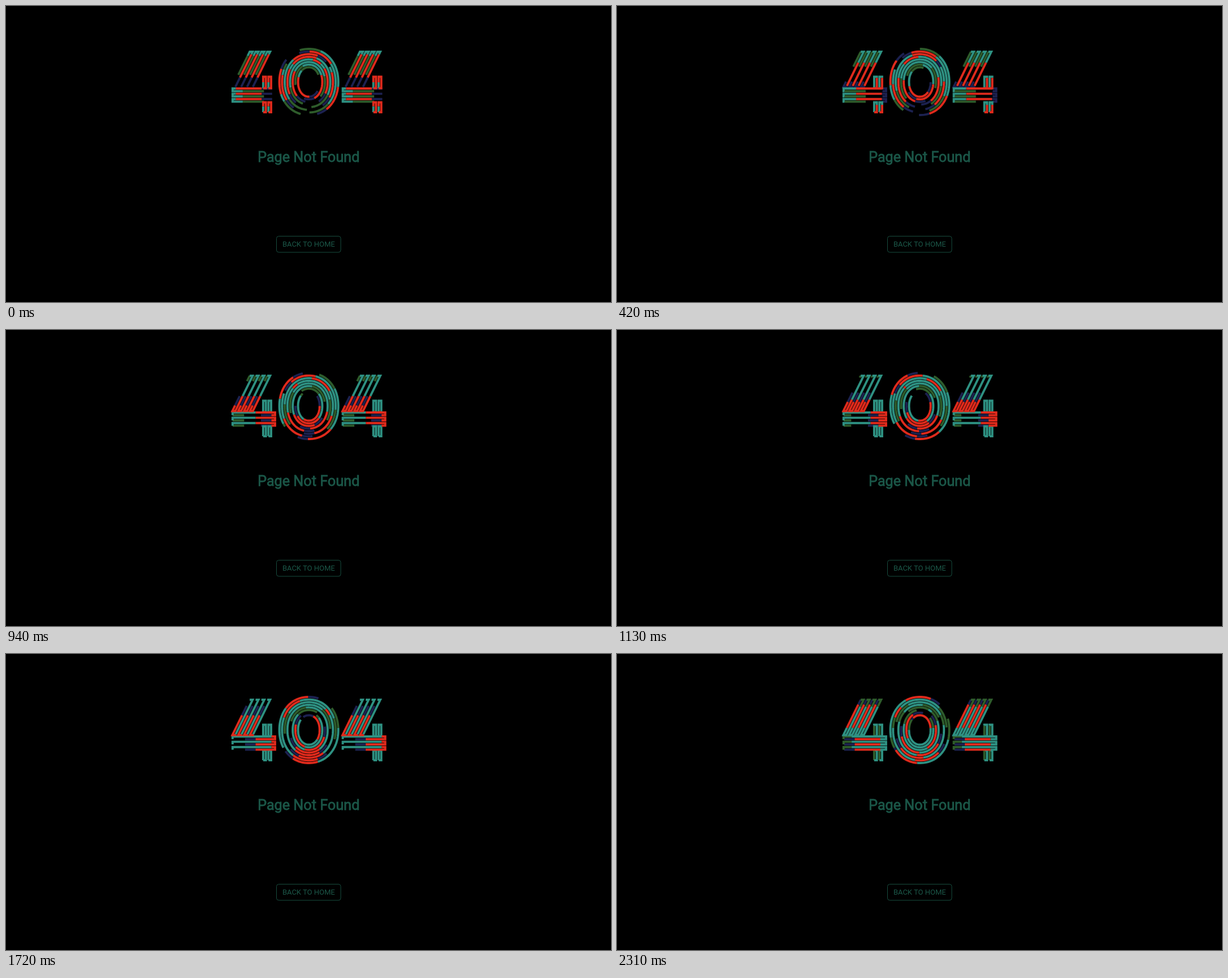
An HTML page that plays this animation: 1068 px wide and 524 px high, repeating every 2.36 s.

```html
<!DOCTYPE html>
<html lang="en">
<head>
<meta charset="utf-8">
<title>404</title>
<style>
  html, body { margin: 0; height: 100%; overflow: hidden; background: #000; }
  svg { display: block; width: 1068px; height: 524px; }
  text { font-family: Roboto, sans-serif; fill: #1b5748; text-anchor: middle; }
  .title { font-size: 25.2px; stroke: #1b5748; stroke-width: .8px; }
  .label { font-size: 13px; }
  .button { fill: none; stroke: #174c3e; }
  #digits { fill: none; stroke-width: 3.9px; }
</style>
</head>
<body>
<svg viewBox="0 0 1068 524">
  <g id="digits"></g>
  <text class="title" x="534.2" y="276">Page Not Found</text>
  <rect class="button" x="477.5" y="407.5" width="113.5" height="28.5" rx="4"/>
  <text class="label" x="534.3" y="426">BACK TO HOME</text>
</svg>
<script>
const LOOP = 2360;        // ms
const STEP = 65.3;        // ms each pose is held
const TRAVEL = 2.33;      // px the dashes advance per pose
const PERIOD = 206.5;     // px until the colours repeat

// Each colour is one dash per period: where it starts and how long it is.
const strands = [
  { color: '#1c2150', start: 56, length: 18.5 },
  { color: '#2e5c2b', start: 104, length: 37.5 },
  { color: '#2e9182', start: 141.5, length: 75.5 },
  { color: '#df2a1c', start: 10.5, length: 45.5 }
];

const outline = points =>
  'M' + points.map(p => p.map(n => n.toFixed(2)).join()).join('L') + 'Z';

// Every bar is a thin outline; its first point is where the dashes emerge.
function four(dx) {
  const bars = [];
  const add = (...points) => bars.push(outline(points.map(([x, y]) => [x + dx, y])));
  for (let i = 0; i < 4; i++) {
    const x = i * 10.3;
    add([430.2 + x, 81], [435.4 + x, 81], [404.8 + x, 143.5], [399.6 + x, 143.5]);
  }
  for (let i = 0; i < 3; i++) {
    const y = 146 + i * 9.35;
    add([400, y + 4.7], [400, y], [475, y], [475, y + 4.7]);
  }
  for (const x of [454, 463.3]) {
    for (const [top, bottom] of [[125.3, 145.5], [170.5, 188]]) {
      add([x, bottom], [x, top], [x + 4.7, top], [x + 4.7, bottom]);
    }
  }
  return bars.join('');
}

// Slightly squared oval, drawn from a start angle in either direction.
function oval(rx, ry, startAngle, direction) {
  const bulge = v => Math.sign(v) * Math.abs(v) ** (2 / 2.12);
  const points = [];
  for (let i = 0; i < 120; i++) {
    const a = (startAngle + direction * i * 3) * Math.PI / 180;
    points.push([534.6 + rx * bulge(Math.cos(a)), 134.5 + ry * bulge(Math.sin(a))]);
  }
  return outline(points);
}

function zero() {
  const startAngles = [149, 203, -31.5, 224, -52, 230, -43, 223];
  return startAngles.map((angle, i) =>
    oval(52 - i * 4.71, 58.5 - i * 4.64, angle, i % 2 ? -1 : 1)).join('');
}

const shape = four(0) + zero() + four(194.5);
const digits = document.getElementById('digits');
for (const strand of strands) {
  const path = document.createElementNS(digits.namespaceURI, 'path');
  path.setAttribute('d', shape);
  path.setAttribute('stroke', strand.color);
  path.setAttribute('stroke-dasharray', `${strand.length} ${PERIOD - strand.length}`);
  strand.path = path;
  digits.append(path);
}

function draw(now) {
  const pose = Math.floor((now % LOOP + 55) / STEP);
  for (const { path, start } of strands) {
    path.setAttribute('stroke-dashoffset', PERIOD - start - pose * TRAVEL);
  }
  requestAnimationFrame(draw);
}
draw(0);
</script>
</body>
</html>
```
